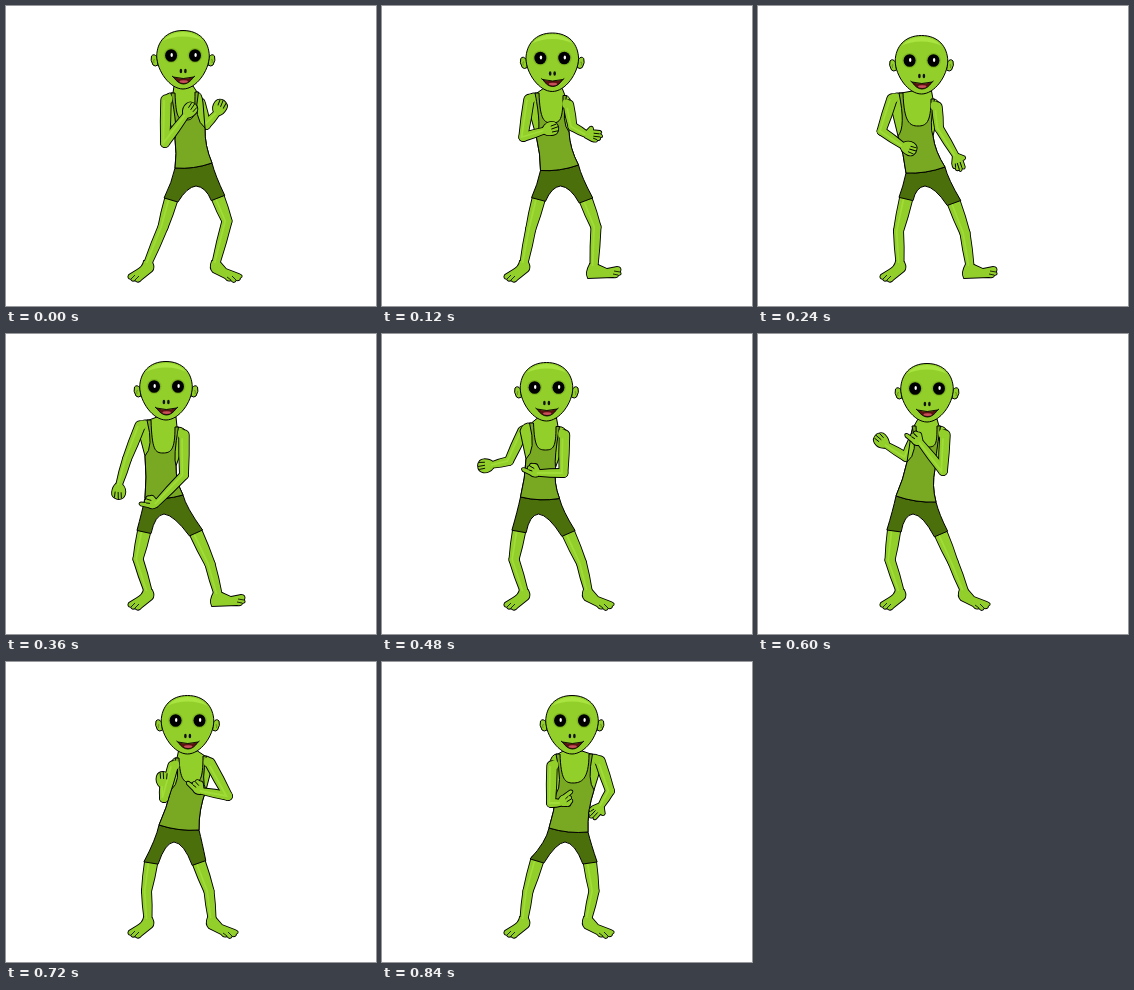
These frames come from a looping animation (370x300 px, 0.96 s). An HTML page:

```html
<!DOCTYPE html>
<html lang="en">
<head>
<meta charset="utf-8">
<title>Dancing alien</title>
<style>
html, body { margin: 0; width: 100%; height: 100%; overflow: hidden; background: #fff; }
svg { display: block; width: 100%; height: 100%; }
</style>
</head>
<body>
<svg id="stage" viewBox="0 0 370 300"></svg>
<script>
const SKIN = '#92cf2a', LIGHT = '#b0ea48', SHIRT = '#79a823', SHORTS = '#4b6f0b';
const STEP = 120;

// head: top of skull; L, R: shoulder, elbow, wrist; lt..rt: shirt corners;
// hems and knees: left, right; turn: hand angles
const guard = {
  head: [177, 24], L: [[160, 94], [159, 137], [180, 109]], R: [[194, 97], [200, 119], [211, 107]],
  turn: [-48, -60], hands: ['fist', 'fist'], back: 'R',
  lt: [167, 87], la: [169, 133], lb: [169, 162], rb: [206, 157], ra: [199, 122], rt: [191, 86], neck: [180, 114],
  hems: [[165, 194], [212, 192]], crotch: 190, knees: [[157, 221], [221, 215]], foot: 'wide'
};
const swing = {
  head: [163.5, 29], L: [[134, 93], [123.5, 125], [145, 140]], R: [[179, 101], [181, 122], [198, 150]],
  turn: [25, 72], hands: ['fist', 'open'], back: '',
  lt: [143, 87], la: [140, 130], lb: [148, 167], rb: [187, 161], ra: [175, 130], rt: [175, 93], neck: [160, 120],
  hems: [[148, 193], [196, 197]], crotch: 167, knees: [[140.5, 225], [207, 227]], foot: 'side'
};
const reach = {
  head: [160, 27], L: [[134, 92], [121, 125], [113, 151]], R: [[178, 101], [178, 141], [150, 170]],
  turn: [97, 186], hands: ['fist', 'point'], back: '',
  lt: [143, 86], la: [139, 122], lb: [139, 164], rb: [177, 161], ra: [170, 132], rt: [171, 93], neck: [157, 119],
  hems: [[138, 198], [190, 199]], crotch: 158, knees: [[132, 225], [204, 230]], foot: 'side'
};
const counter = {
  head: [169, 29], L: [[155, 108], [148, 123], [128, 111]], R: [[187, 101], [185, 137], [162, 108]],
  turn: [228, 212], hands: ['fist', 'point'], back: 'L',
  lt: [156, 92], la: [149, 128], lb: [138, 162], rb: [178, 168], ra: [177, 135], rt: [181, 92], neck: [170, 113],
  hems: [[136, 197], [183, 200]], crotch: 155, knees: [[132, 226], [195, 228]], foot: 'front'
};
const jab = {
  head: [181.5, 33], L: [[167, 104], [158, 136], [157, 124]], R: [[204, 101], [222, 134], [195, 129]],
  turn: [-85, 217], hands: ['fist', 'point'], back: '',
  lt: [171, 96], la: [165, 128], lb: [153, 163], rb: [193, 168], ra: [200, 128], rt: [199, 94], neck: [186, 121],
  hems: [[145, 201], [193, 201]], crotch: 168, knees: [[140.5, 229], [203, 229]], foot: 'front'
};
const sway = {
  head: [190, 33], L: [[170, 104], [169, 141], [179, 141]], R: [[218, 99], [228, 129], [219, 144]],
  turn: [-43, 133], hands: ['point', 'open'], back: '',
  lt: [176, 92], la: [174, 132], lb: [167, 166], rb: [206, 170], ra: [212, 128], rt: [209, 92], neck: [191, 121],
  hems: [[155, 199], [208, 201]], crotch: 183, knees: [[146, 229], [212, 229]], foot: 'front'
};

function mix(a, b) {
  if (typeof a === 'number') return (a + b) / 2;
  if (Array.isArray(a)) return a.map((v, i) => mix(v, b[i]));
  if (typeof a === 'string') return b;
  return Object.fromEntries(Object.keys(a).map(k => [k, mix(a[k], b[k])]));
}

const drop = mix(guard, swing);
const lift = mix(reach, counter);
lift.L = [[141, 97], [127, 127], [110, 131]];
lift.turn[0] = 178;
const poses = [guard, drop, swing, reach, lift, counter, jab, sway];

const HANDS = {
  fist: ['M-1 -3Q3 -8 9 -7Q14 -6 14 0Q13 6 8 6Q2 6 -1 3Z', 'M13 -4L7 -3M14 -1L7 0M13 3L7 3'],
  open: ['M-1 -3L3 -8Q6 -9 6 -5L13 -5Q16 -4 13 -2L15 -1Q17 1 14 1L14 3Q13 5 11 4Q12 7 6 6L-1 3Z',
    'M13 -2L7 -2M14 1L7 1M11 4L7 3'],
  point: ['M-1 -3Q3 -6 7 -4L15 -3Q18 -1 15 0L10 0Q13 2 10 4Q11 7 7 7Q4 9 2 6L-1 3Z', 'M10 0L6 0M10 4L5 3']
};
const LEFT_FOOT = 'M138 255Q137 261 131 264L123 269Q121 272 125 273Q126 276 129 274Q132 278 136 273L146 265Q149 262 146 256Z';
const FRONT_FOOT = 'M202 255Q199 262 203 266L215 272Q218 276 221 274Q224 278 226 274Q230 275 230 272Q234 270 229 268L216 263L209 255Z';
const SIDE_FOOT = 'M208 258Q203 267 206 272L231 271Q236 272 236 269Q240 269 238 266Q240 261 235 261L225 263L216 259Z';
const FEET = {
  wide: [[210, 257], FRONT_FOOT, 'translate(4 0)'],
  front: [[206, 256], FRONT_FOOT, ''],
  side: [[212, 260], SIDE_FOOT, '']
};

const path = (d, attr) => `<path d="${d}" ${attr}/>`;
const inked = (d, fill) => path(d, `fill="${fill}" stroke="#000"`);
const oval = (x, y, rx, ry, fill) => `<ellipse cx="${x}" cy="${y}" rx="${rx}" ry="${ry}" fill="${fill}"/>`;

// Tapered segment with round ends
function segment(a, b, ra, rb) {
  const dx = b[0] - a[0], dy = b[1] - a[1], len = Math.hypot(dx, dy);
  const nx = -dy / len, ny = dx / len, rm = (ra + rb) / 2 + .7;
  const mid = mix(a, b);
  const at = (p, r) => `${p[0] + nx * r} ${p[1] + ny * r}`;
  return `M${at(a, ra)}Q${at(mid, rm)} ${at(b, rb)}A${rb} ${rb} 0 0 0 ${at(b, -rb)}` +
    `Q${at(mid, -rm)} ${at(a, -ra)}A${ra} ${ra} 0 0 0 ${at(a, ra)}Z`;
}

// Outlines first, then fills, so the parts merge into one shape
function limb(points, radii, end, move) {
  const parts = [0, 1].map(i => [segment(points[i], points[i + 1], radii[i], radii[i + 1]), '']);
  parts.push([end, move]);
  const layer = attr => parts.map(([d, t]) => path(d, `${attr} transform="${t}"`)).join('');
  const shine = 'M' + points.map((p, i) => [p[0] - radii[i] * .4, p[1]]).join('L');
  return layer('stroke="#000" stroke-width="1.8" fill="none"') + layer(`fill="${SKIN}"`) +
    path(shine, `fill="none" stroke="${LIGHT}" stroke-width="1.8" opacity=".5"`);
}

function arm(pose, side) {
  const i = side === 'L' ? 0 : 1, joints = pose[side], [shoulder, , wrist] = joints;
  const move = `translate(${wrist}) rotate(${pose.turn[i]})`;
  const [hand, lines] = HANDS[pose.hands[i]];
  const inward = i ? -2.5 : 2.5;
  return limb(joints, [4.8, 4, 2.8], hand, move) +
    oval(shoulder[0] + inward, shoulder[1] - 1, 3.8, 4.4, SKIN) +
    path(lines, `transform="${move}" fill="none" stroke="#000" stroke-width=".9"`);
}

function legs({ hems, knees, foot }) {
  const [ankle, shape, move] = FEET[foot];
  return limb([hems[0], knees[0], [142, 257]], [6.2, 4.6, 3.6], LEFT_FOOT, '') +
    limb([hems[1], knees[1], ankle], [6.2, 4.6, 3.6], shape, move) +
    path('M125 273L129 269M129 274L133 270', 'fill="none" stroke="#000" stroke-width=".8"') +
    path(foot === 'side' ? 'M236 269L231 268M238 266L232 265' : 'M221 274L217 271M226 274L222 270',
      `transform="${move}" fill="none" stroke="#000" stroke-width=".8"`);
}

function trunk({ head: [x, y], L, R, lt, la, lb, rb, ra, rt, neck }) {
  const lm = mix(la, lb), rm = mix(ra, rb), hem = mix(lb, rb);
  const flank = `Q${lm[0] + 2} ${lm[1]} ${lb}Q${hem[0]} ${hem[1] + 4} ${rb}Q${rm[0] - 4} ${rm[1]} ${ra}`;
  const skin = `M${la}${flank}L${R[0][0] + 3} ${R[0][1]}Q${R[0][0] + 2} ${rt[1]} ${rt}` +
    `L${x + 10} ${y + 56}L${x - 9} ${y + 56}L${lt}Q${L[0][0] - 1} ${lt[1] - 1} ${L[0][0] - 3} ${L[0][1]}Z`;
  const shirt = `M${lt[0] - 2} ${lt[1]}Q${lt[0] + 5} ${la[1] - 9} ${la}${flank}` +
    `Q${rt[0] - 4} ${ra[1] - 9} ${rt[0] + 1.5} ${rt[1]}` +
    `L${rt[0] - 2} ${rt[1]}C${rt[0] - 2} ${neck[1] - 3} ${neck[0] + 8} ${neck[1]} ${neck}` +
    `C${neck[0] - 8} ${neck[1]} ${lt[0] + 3} ${neck[1] - 3} ${lt[0] + 2} ${lt[1]}Z`;
  return [inked(skin, SKIN), inked(shirt, SHIRT)];
}

function shorts({ lb, rb, hems, knees, crotch }) {
  const cuff = i => {
    const [x, y] = hems[i], dx = knees[i][0] - x, dy = knees[i][1] - y, k = 7.2 / Math.hypot(dx, dy);
    return [[x - dy * k, y + dx * k], [x + dy * k, y - dx * k]];
  };
  const [lo, li] = cuff(0), [ri, ro] = cuff(1);
  return inked(`M${lb}Q${lb[0] - 3} ${lb[1] + 14} ${lo}L${li}Q${crotch - 9} 181 ${crotch} 180` +
    `Q${crotch + 10} 181 ${ri}L${ro}Q${rb[0] + 3} ${rb[1] + 12} ${rb}Q${(lb[0] + rb[0]) / 2} ${(lb[1] + rb[1]) / 2 + 4} ${lb}Z`, SHORTS);
}

const eye = x => oval(x, 25.5, 7.4, 7.6, '#7fb722') + oval(x, 25.5, 6, 6.3, '#000') + oval(x + .6, 25, 1.2, 2, '#fff');
const ear = s => path('M26 27Q29 23 31.5 26Q33 30 30 35Q28 37 25 35Z', `fill="${SKIN}" stroke="#000" transform="scale(${s} 1)"`) +
  path('M28 30Q30 28 29 33', `fill="none" stroke="#5b8a16" stroke-width=".8" transform="scale(${s} 1)"`);

const face = ear(1) + ear(-1) +
  inked('M0 .5C17 .5 26 12 26.3 26C26 41 13 59 0 59C-13 59 -26 41 -26.3 26C-26 12 -17 .5 0 .5Z', SKIN) +
  path('M-20 11Q-13 2 0 2Q13 2 20 11Q12 6.5 0 6.5Q-12 6.5 -20 11Z', `fill="${LIGHT}" opacity=".8"`) +
  eye(-11.9) + eye(12) + oval(-2.1, 41, 1.3, 2.3, '#111') + oval(2.4, 41, 1.3, 2.3, '#111') +
  path('M-9.5 47Q0 50 10.5 47Q6 54 .5 54Q-5 54 -9.5 47Z', 'fill="#5c1210" stroke="#000" stroke-width=".9"') +
  oval(.7, 51.6, 4.2, 1.4, '#c8505a') +
  path('M-11 46L-9 47.5M12 46L10 47.5', 'stroke="#000"');

function draw(pose) {
  const [body, shirt] = trunk(pose);
  const arms = ['L', 'R'];
  const behind = arms.filter(s => s === pose.back), front = arms.filter(s => s !== pose.back);
  return behind.map(s => arm(pose, s)).join('') + legs(pose) + body + shorts(pose) + shirt +
    front.map(s => arm(pose, s)).join('') + `<g transform="translate(${pose.head})">${face}</g>`;
}

const stage = document.getElementById('stage');
const start = performance.now();
let shown = -1;

function update(now) {
  const step = Math.floor(Math.max(0, now - start) / STEP) % poses.length;
  if (step !== shown) {
    stage.innerHTML = draw(poses[step]);
    shown = step;
  }
  requestAnimationFrame(update);
}
update(start);
</script>
</body>
</html>
```
